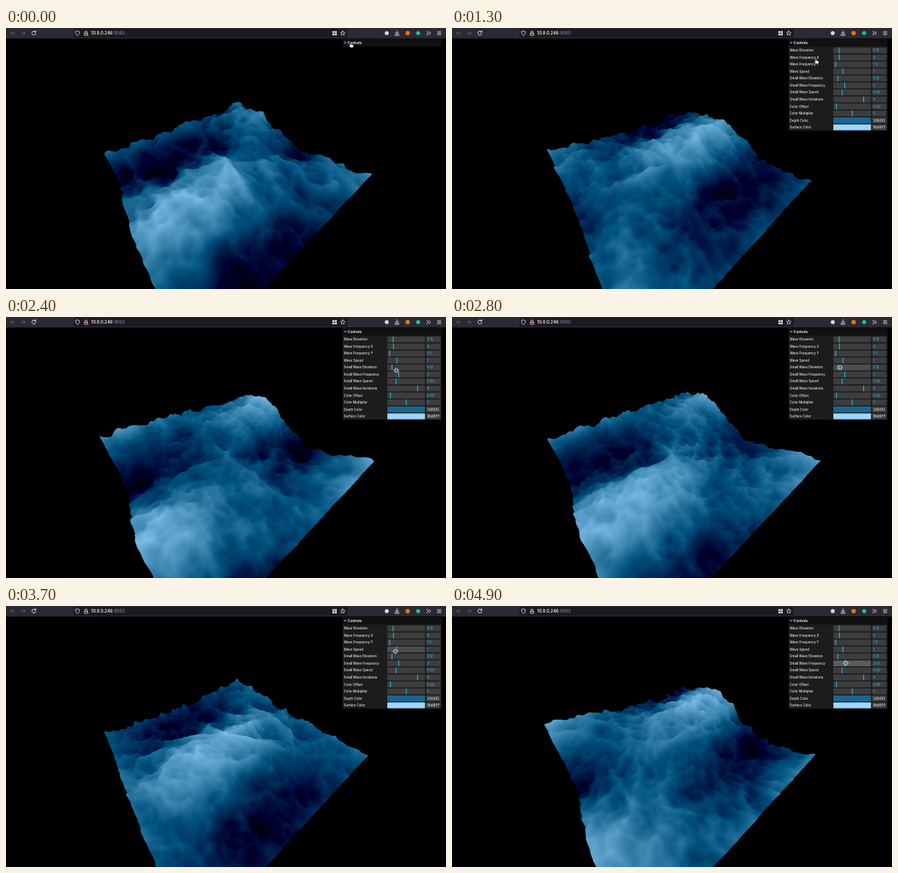
Animation of 600 by 356 pixels, one loop 5 s. Source, as an HTML page with a canvas:

```html
<!DOCTYPE html>
<html lang="en">
<head>
<meta charset="utf-8">
<title>Sea</title>
<style>
  html, body { margin: 0; width: 100%; height: 100%; overflow: hidden; background: #000; }
  #stage { position: relative; width: 600px; height: 356px; overflow: hidden; }
  #sea { position: absolute; left: 0; top: 14px; width: 600px; height: 342px; }
  #ui { position: absolute; left: 0; top: 0; }
  text { font-family: Inter, Roboto, sans-serif; white-space: pre; }
  .label, .value { font-size: 4.45px; font-weight: 500; fill: #ebebeb; }
  .value { fill: #2cb4e6; }
  .hex { font: 500 4.7px "Noto Sans Mono", "DejaVu Sans Mono", monospace; fill: #ebebeb; }
  .line { fill: none; stroke: #e8e8ec; stroke-width: .9; stroke-linecap: round; stroke-linejoin: round; }
</style>
</head>
<body>
<div id="stage">
  <canvas id="sea" width="1200" height="684"></canvas>
  <svg id="ui" width="600" height="356" viewBox="0 0 600 356">
    <rect width="600" height="14.4" fill="#2b2a33"/>
    <rect y="14" width="600" height=".6" fill="#0c0c0d"/>
    <rect x="92" y="1" width="374" height="12" rx="1.6" fill="#1c1b22"/>
    <g class="line">
      <path d="M12 7H6.5M9 4.5L6.5 7L9 9.5M20.500 7H26M23.500 4.500L26 7L23.500 9.500" stroke="#62616a"/>
      <path d="M40.300 5.300A2.700 2.700 0 1 0 40.700 7.500M40.600 3.800V5.700H38.700"/>
      <path d="M97.500 4L100.200 5C100.200 8 99.200 9.500 97.500 10.300C95.800 9.500 94.800 8 94.800 5Z" stroke-width=".8"/>
      <path d="M107.300 7H111.200V10H107.300ZM108 7V5.400A1.250 1.250 0 0 1 110.500 5.400V7" stroke-width=".8"/>
      <path d="M106.600 4.400L112 10.300" stroke="#ff5a6e"/>
      <path d="M459.200 3.900L460.100 5.900L462.300 6.100L460.700 7.600L461.100 9.800L459.200 8.700L457.300 9.800L457.700 7.600L456.100 6.100L458.300 5.900Z" stroke-width=".75"/>
      <path d="M533.200 3.800V8M531.200 6.200L533.200 8.200L535.200 6.200M530.700 8.500V10H535.700V8.500"/>
      <path d="M573.700 4.600L576 7L573.700 9.400M576.500 4.600L578.800 7L576.500 9.400"/>
      <path d="M588.300 5H593M588.300 7H593M588.300 9H593" stroke-width=".8"/>
    </g>
    <path d="M445.200 4.300h2.500v2.400h-2.500zM448.500 4.300h2.500v2.400h-2.500zM445.200 7.500h2.500v2.400h-2.500zM448.500 7.500h2.500v2.400h-2.500z" fill="#f0f0f4"/>
    <circle cx="519.200" cy="7" r="2.700" fill="#d8d8dd"/>
    <circle cx="547.700" cy="7" r="3" fill="#e2761b"/>
    <circle cx="562" cy="7" r="2.700" fill="#14c8a0"/>
    <text x="116" y="9.100" font-size="5.9" font-weight="500" fill="#fbfbfe">10.8.0.246<tspan fill="#8f8f9a" font-weight="400">:9060</tspan></text>

    <clipPath id="clip"><rect id="reveal" x="458" y="15" width="137" height="125.500"/></clipPath>
    <g clip-path="url(#clip)">
      <rect x="459" y="15" width="135" height="125.200" fill="#1c1c1c"/>
      <g id="rows"></g>
    </g>
    <rect x="459" y="15" width="135" height="10.200" fill="#111"/>
    <path id="chevron" class="line" d="M-.7 -1.300L.8 0L-.7 1.300" stroke-width=".8"/>
    <text x="466" y="21.700" font-size="4.600" font-weight="650" fill="#ebebeb">Controls</text>

    <g id="hand">
      <path d="M-1.500 -3C-1.500 -4 -.2 -4 -.2 -3V-1L2.400 -.5C3 -.3 3.200 .2 3.100 .8L2.500 3.300H-.9L-2.900 .7C-3.200 0 -2.400 -.5 -1.500 .3Z" fill="#fff" stroke="#111" stroke-width=".5"/>
    </g>
    <path id="resize" d="M0 -3.400L1.300 -1.900H.8V-.8H2V-1.400L3.600 0L2 1.400V.8H.8V1.900H1.300L0 3.400L-1.300 1.900H-.8V.8H-2V1.400L-3.600 0L-2 -1.400V-.8H-.8V-1.900H-1.300Z" fill="#222" stroke="#fff" stroke-width=".7"/>
  </svg>
</div>
<script>
const $ = id => document.getElementById(id);
const LOOP = 5000, STEP = 100;

// ---- control panel ----
const sliders = [
  ['Wave Elevation', '0.15', .15], ['Wave Frequency X', '4', .16],
  ['Wave Frequency Y', '1.5', .06], ['Wave Speed', '1', .25],
  ['Small Wave Elevation', '0.12', .12], ['Small Wave Frequency', '3', .3],
  ['Small Wave Speed', '0.92', .23], ['Small Wave Iterations', '4', .8],
  ['Color Offset', '0.08', .08], ['Color Multiplier', '5', .5]
];
const swatches = [['Depth Color', '186691'], ['Surface Color', '9bd8ff']];
const WIDGET = '#3d3d3d', HOVER = '#4d4d4d', ACTIVE = '#5c5c5c';
const rowY = i => 30.6 + i * 9.54;
const markX = part => 519.6 + part * 51.4;
const box = (x, y, w, fill, extra = '') =>
  `<rect x="${x}" y="${y - 4}" width="${w}" height="8" rx=".8" fill="${fill}" ${extra}/>`;
const text = (x, y, cls, s) => `<text x="${x}" y="${y + 1.6}" class="${cls}">${s}</text>`;

$('rows').innerHTML = sliders.map(([name, val, part], i) => {
  const y = rowY(i);
  return text(460.6, y, 'label', name) + box(520, y, 51.4, WIDGET, 'class="track"') +
    `<rect class="mark" x="${markX(part)}" y="${y - 4}" width="1.1" height="8" fill="#2cb4e6"/>` +
    box(573, y, 19.4, WIDGET) + text(574.3, y, 'value', val);
}).join('') + swatches.map(([name, hex], i) => {
  const y = rowY(i + 10);
  return text(460.6, y, 'label', name) + box(520, y, 51.4, '#' + hex) +
    box(573, y, 19.4, WIDGET) + text(574.2, y, 'hex', hex);
}).join('');

const tracks = document.querySelectorAll('.track');
const marks = document.querySelectorAll('.mark');
const values = document.querySelectorAll('.value');

// time, x, y
const path = [[0, 470, 22.5], [600, 471, 22.5], [1000, 471, 22.5], [1700, 535, 78],
  [1900, 536.3, 78.3], [2800, 529.3, 69], [3300, 531.2, 60], [3700, 531, 62],
  [4200, 530, 75], [4700, 536, 78], [4900, 537, 77.8], [5000, 537, 77.8]];

function cursorAt(ms) {
  let i = 1;
  while (path[i][0] < ms) i++;
  const [t0, x0, y0] = path[i - 1], [t1, x1, y1] = path[i];
  const p = (ms - t0) / (t1 - t0), e = p * p * (3 - 2 * p);
  return [x0 + (x1 - x0) * e, y0 + (y1 - y0) * e];
}

function drawPanel(ms) {
  const open = Math.min(1, Math.max(0, (ms - 100) / 300));
  $('reveal').setAttribute('height', 10 + 115.5 * open * (2 - open));
  $('chevron').setAttribute('transform', `translate(462.600 20) rotate(${open > 0 ? 90 : 0})`);

  const [x, y] = cursorAt(ms), onSlider = x > 519;
  $('hand').setAttribute('transform', `translate(${x + .8} ${y + 1})`);
  $('resize').setAttribute('transform', `translate(${x} ${y})`);
  $('hand').style.display = onSlider ? 'none' : '';
  $('resize').style.display = onSlider ? '' : 'none';

  const drag = ms >= 4900;
  tracks.forEach((el, i) => {
    const over = onSlider && Math.abs(y - rowY(i)) < 4;
    el.setAttribute('fill', over ? (drag ? ACTIVE : HOVER) : WIDGET);
  });
  marks[5].setAttribute('x', markX(drag ? .307 : .3));
  values[5].textContent = drag ? '3.07' : '3';
}

// ---- gradient noise ----
const perm = Array.from({ length: 289 }, (_, i) => (34 * i + 1) * i % 289);
const gX = new Float64Array(289), gY = new Float64Array(289), gZ = new Float64Array(289);
const fract = v => v - Math.floor(v);
for (let h = 0; h < 289; h++) {
  let x = fract(h / 7), y = fract(Math.floor(h / 7) / 7) - .5;
  const z = .5 - Math.abs(x) - Math.abs(y);
  if (z <= 0) { x -= .5; y -= y >= 0 ? .5 : -.5; }
  const n = 1.79284291400159 - .85373472095314 * (x * x + y * y + z * z);
  gX[h] = x * n; gY[h] = y * n; gZ[h] = z * n;
}
const wrap = v => ((v % 289) + 289) % 289;
const fade = t => t * t * t * (t * (t * 6 - 15) + 10);
const mix = (a, b, t) => a + (b - a) * t;

function noise(x, y, z) {
  const X = Math.floor(x), Y = Math.floor(y), Z = Math.floor(z);
  const fx = x - X, fy = y - Y, fz = z - Z;
  const iy = wrap(Y), iz = wrap(Z);
  const a = perm[wrap(X)], b = perm[wrap(X + 1)];
  const u = fade(fx), v = fade(fy), w = fade(fz);
  const dot = (col, k, px, py, pz) => {
    const h = perm[(col + iz + k) % 289];
    return gX[h] * px + gY[h] * py + gZ[h] * pz;
  };
  const c00 = perm[(a + iy) % 289], c10 = perm[(b + iy) % 289];
  const c01 = perm[(a + iy + 1) % 289], c11 = perm[(b + iy + 1) % 289];
  const layer = (k, pz) => mix(
    mix(dot(c00, k, fx, fy, pz), dot(c10, k, fx - 1, fy, pz), u),
    mix(dot(c01, k, fx, fy - 1, pz), dot(c11, k, fx - 1, fy - 1, pz), u), v);
  return 2.2 * mix(layer(0, fz), layer(1, fz - 1), w);
}

function elevation(x, z, t, freq) {
  let h = Math.sin(4 * x + t) * Math.sin(1.5 * z + t) * .15;
  for (let i = 1; i <= 4; i++)
    h -= Math.abs(noise(x * freq * i, z * freq * i, t * .92) * .12 / i);
  return h;
}

// ---- sea surface ----
const W = 1200, H = 684, N = 240, M = N + 1;
const START = 3 * Math.PI - 2.3, TINT = .015;
const ctx = $('sea').getContext('2d');
const image = ctx.createImageData(W, H), px = image.data;
const depth = new Float32Array(W * H);
const sx = new Float32Array(M * M), sy = new Float32Array(M * M);
const inv = new Float32Array(M * M), high = new Float32Array(M * M);

const rad = Math.PI / 180, DIST = Math.sqrt(3);
const FOCAL = H / 2 / Math.tan(37.5 * rad);
const sinA = Math.sin(52.5 * rad), cosA = Math.cos(52.5 * rad);
const sinE = Math.sin(48 * rad), cosE = Math.cos(48 * rad);

function triangle(a, b, c) {
  const ax = sx[a], ay = sy[a], bx = sx[b], by = sy[b], cx = sx[c], cy = sy[c];
  const area = (bx - ax) * (cy - ay) - (by - ay) * (cx - ax);
  if (!area) return;
  const x0 = Math.max(0, Math.ceil(Math.min(ax, bx, cx) - .5));
  const x1 = Math.min(W - 1, Math.floor(Math.max(ax, bx, cx) - .5));
  const y0 = Math.max(0, Math.ceil(Math.min(ay, by, cy) - .5));
  const y1 = Math.min(H - 1, Math.floor(Math.max(ay, by, cy) - .5));
  for (let y = y0; y <= y1; y++) {
    const py = y + .5;
    for (let x = x0; x <= x1; x++) {
      const qx = x + .5;
      const u = ((bx - qx) * (cy - py) - (by - py) * (cx - qx)) / area;
      const v = ((cx - qx) * (ay - py) - (cy - py) * (ax - qx)) / area;
      const w = 1 - u - v;
      if (u < -1e-4 || v < -1e-4 || w < -1e-4) continue;
      const d = u * inv[a] + v * inv[b] + w * inv[c], k = y * W + x;
      if (d <= depth[k]) continue;
      depth[k] = d;
      const m = (u * high[a] + v * high[b] + w * high[c] + TINT) * 5, o = k * 4;
      px[o] = 24 + 131 * m;
      px[o + 1] = 102 + 114 * m;
      px[o + 2] = 145 + 110 * m;
      px[o + 3] = 255;
    }
  }
}

function drawSea(ms) {
  const t = START + ms / 1000;
  const freq = ms >= 4900 ? 3.07 : 3;
  px.fill(0);
  depth.fill(0);
  for (let j = 0, k = 0; j < M; j++) {
    for (let i = 0; i < M; i++, k++) {
      const x = 2 * i / N - 1, z = 2 * j / N - 1;
      const h = elevation(x, z, t, freq);
      const right = x * cosA - z * sinA, near = x * sinA + z * cosA;
      const d = DIST - near * cosE - h * sinE;
      high[k] = h;
      inv[k] = 1 / d;
      sx[k] = W / 2 + FOCAL * right / d;
      sy[k] = H / 2 + FOCAL * (near * sinE - h * cosE) / d;
    }
  }
  for (let j = 0; j < N; j++) {
    for (let i = 0; i < N; i++) {
      const k = j * M + i;
      triangle(k, k + 1, k + M);
      triangle(k + 1, k + M + 1, k + M);
    }
  }
  ctx.putImageData(image, 0, 0);
}

// the picture advances in steps of 100 ms
let last = -1;
function tick() {
  const ms = Math.floor(performance.now() % LOOP / STEP) * STEP;
  if (ms !== last) {
    last = ms;
    drawPanel(ms);
    drawSea(ms);
  }
  requestAnimationFrame(tick);
}
tick();
</script>
</body>
</html>
```
